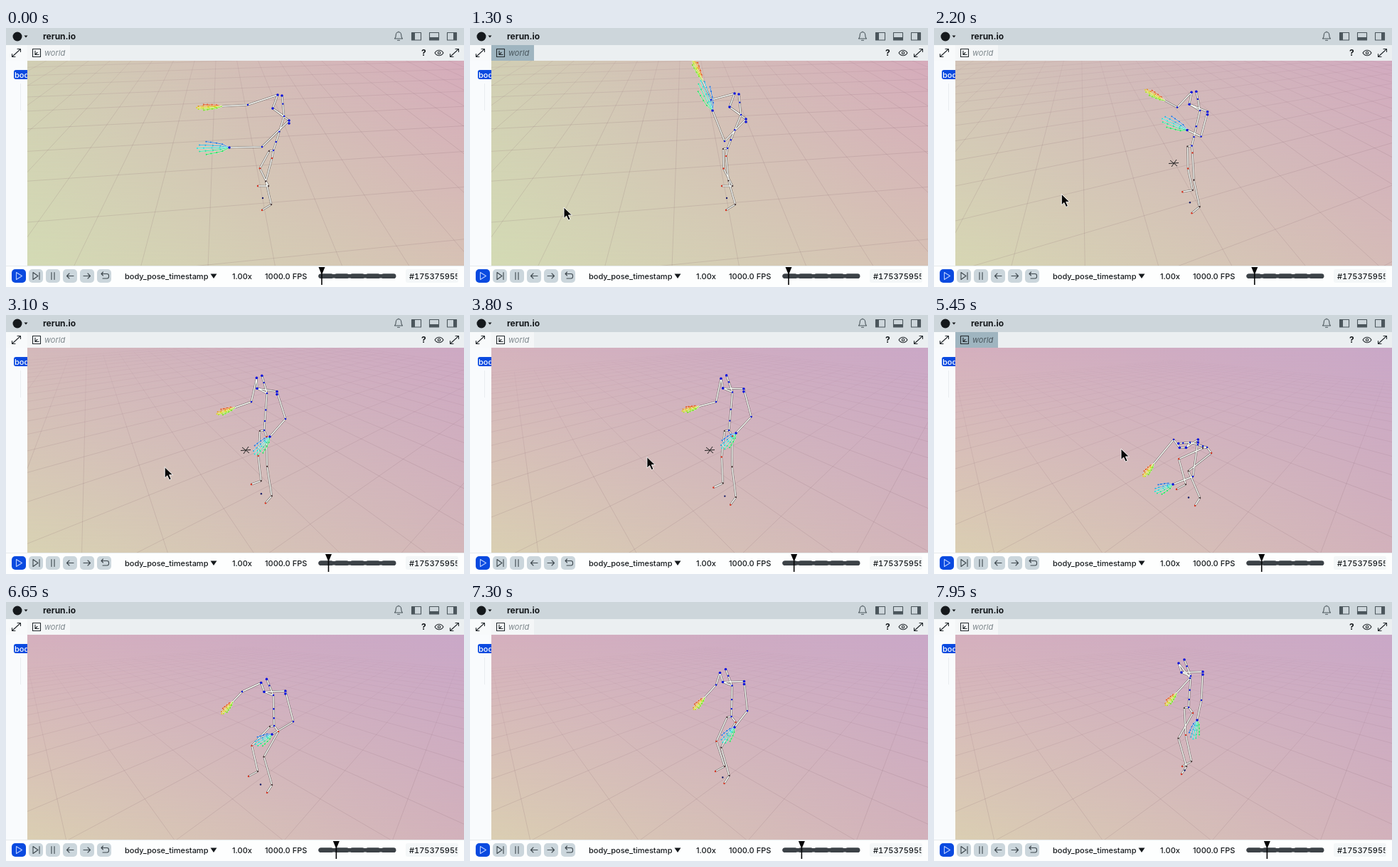
These frames come from a looping animation (644x364 px, 8 s). An HTML page:

```html
<!DOCTYPE html>
<html lang="en">
<head>
<meta charset="utf-8">
<title>Body pose viewer</title>
<style>
  html, body { margin: 0; width: 100%; height: 100%; overflow: hidden; background: #fff; }
  svg { display: block; width: 100vw; height: 100vh; }
  text { font: 450 11px Inter, sans-serif; fill: #15191c; }
  .title { font-size: 12px; font-weight: 700; }
  .icon { fill: none; stroke: #4b565c; stroke-width: 1.1; stroke-linecap: round; stroke-linejoin: round; }
  #label { font-style: italic; }
  #stamp { font-variant-numeric: tabular-nums; }
</style>
</head>
<body>
<svg viewBox="0 0 644 364" preserveAspectRatio="none">
  <defs>
    <linearGradient id="top"><stop/><stop offset="1"/></linearGradient>
    <linearGradient id="bottom"><stop/><stop offset="1"/></linearGradient>
    <linearGradient id="fade" x2="0" y2="1"><stop stop-color="#000"/><stop offset="1" stop-color="#fff"/></linearGradient>
    <linearGradient id="ink" gradientUnits="userSpaceOnUse" x1="0" x2="0">
      <stop stop-color="#7d4a66" stop-opacity="0"/><stop offset="1" stop-color="#7d5a66" stop-opacity=".17"/>
    </linearGradient>
    <mask id="lower" style="mask-type:luminance"><rect x="30" y="46" width="614" height="288" fill="url(#fade)"/></mask>
    <clipPath id="view"><rect x="30" y="46" width="614" height="288"/></clipPath>
    <clipPath id="side"><rect y="46" width="30" height="288"/></clipPath>
    <clipPath id="chip"><rect x="562" y="338" width="72.5" height="22"/></clipPath>
  </defs>

  <g clip-path="url(#view)">
    <rect x="30" y="46" width="614" height="288" fill="url(#top)"/>
    <rect x="30" y="46" width="614" height="288" fill="url(#bottom)" mask="url(#lower)"/>
    <path id="grid" fill="none" stroke="url(#ink)"/>
    <path id="cross" d="M330 190.500l14-1M332 186l10 8M341 185l-7 10" stroke="#222" fill="none"/>
    <path id="edge" fill="none" stroke="#62605f" stroke-width="2.5" stroke-linejoin="round"/>
    <path id="bone" fill="none" stroke="#fbfbf6" stroke-width="1.4" stroke-linejoin="round"/>
    <g id="marks"></g>
  </g>

  <!-- header and tabs -->
  <rect width="644" height="24" fill="#cdd6db"/>
  <circle cx="16" cy="12" r="6.5" fill="#15191c"/>
  <path d="M25.5 10.5h5l-2.500 3z" fill="#15191c"/>
  <text class="title" x="52" y="16">rerun.io</text>
  <g class="icon">
    <path d="M546.5 15h11c-1.5-1.5-1.8-3-1.8-5.5a3.7 3.7 0 0 0-7.4 0c0 2.5-.3 4-1.8 5.5zM550.5 17.2h3M552 5v.6"/>
    <path d="M570.5 6.500h13v10.500h-13zM595.500 6.500h13v10.500h-13zM620.500 6.500h13v10.500h-13z"/>
  </g>
  <path d="M571 7h4v10h-4zM596 13h12v4h-12zM629 7h4v10h-4z" fill="#4b565c"/>
  <rect y="24" width="644" height="22" fill="#ebeff1"/>
  <rect y="24" width="30" height="22" fill="#f8fafb"/>
  <rect id="tab" x="30" y="24" width="60" height="22"/>
  <g class="icon" style="stroke:#23292d">
    <path d="M9 40l11-10M16 29.5h4.5v4M8.5 36.5v4H13M625 40l11-10M632 29.5h4.5v4M624.5 36.5v4H629"/>
    <path d="M37.5 29.5h11v11h-11zM41 32v5.5h5M41 37.5l3-3"/>
    <path d="M603 35c3-5 9-5 12 0c-3 5-9 5-12 0z"/><circle cx="609" cy="35" r="1.7"/>
  </g>
  <text id="label" x="54" y="38.5">world</text>
  <text class="title" x="584" y="39">?</text>

  <!-- side panel -->
  <g clip-path="url(#side)">
    <rect y="46" width="30" height="288" fill="#f9fbfd"/>
    <path d="M20.5 78v38" stroke="#e9edf0"/>
    <rect x="11" y="59" width="40" height="13" rx="3" fill="#0a4ae0"/>
    <text x="12" y="69.5" style="fill:#fff">body</text>
  </g>

  <!-- playback bar -->
  <rect y="334" width="644" height="30" fill="#fdfefe"/>
  <path d="M0 334.5h644" stroke="#e6eaec"/>
  <g id="buttons"></g>
  <g class="icon" style="stroke:#3d474d">
    <path d="M14.5 343.5v10l8-5z" stroke="#b9ccff"/>
    <path d="M38 343.5v10l7-5zM47 343.5v10M64 343.5v10M68 343.5v10M95 348.5H85.5M89 345l-3.5 3.5l3.5 3.5M109 348.5h9.5M115 345l3.5 3.5l-3.5 3.5"/>
    <path d="M134 345.5h8a2.5 2.5 0 0 1 2.5 2.5v1.5a2.5 2.5 0 0 1-2.5 2.5h-6M136.5 343l-2.5 2.5l2.5 2.5"/>
  </g>
  <text x="167" y="352.5">body_pose_timestamp</text>
  <path d="M287.5 345.5h9l-4.5 6.5z" fill="#15191c"/>
  <text x="318" y="352.5">1.00x</text>
  <text x="364" y="352.5">1000.0 FPS</text>
  <g stroke="#3c4247" stroke-linecap="round">
    <path d="M442 348.7H545.500" stroke-width="5.500"/>
    <path d="M443 348.700H545" stroke-width="6.700" stroke-dasharray="14 8"/>
  </g>
  <path id="playhead" d="M-4.5 336h9L.8 345v16h-1.6v-16z" fill="#050607"/>
  <rect x="562" y="339" width="74" height="19" rx="3" fill="#f4f7f8"/>
  <g clip-path="url(#chip)"><text id="stamp" x="567" y="352.5">#1753759555</text></g>

  <path id="pointer" d="M0 0v15.500l3.600-3.400l2.700 6l2.800-1.200l-2.700-5.900h5z" fill="#080808" stroke="#fff" stroke-width=".9"/>
</svg>
<script>
const LOOP = 8000, STEP = 50;
const DRAG_START = 1400, DRAG_END = 4500;
const $ = id => document.getElementById(id);
const mix = (a, b, k) => a + (b - a) * k;
const mixAll = (a, b, k) => a.map((v, i) => mix(v, b[i], k));
const add = (a, b) => [a[0] + b[0], a[1] + b[1]];
const clamp01 = v => Math.min(1, Math.max(0, v));
const easeOut = (u, power) => 1 - (1 - u) ** power;

// The performer's main joints; everything else on the body follows from these.
const moves = [
  { time: 0,    neck: [391,124], hip: [376,172], elbowA: [340,108], handA: [304,110], elbowB: [360,167], handB: [314,168] },
  { time: 1300, neck: [381,122], hip: [362,169], elbowA: [339,101], handA: [327,74],  elbowB: [358,159], handB: [341,116] },
  { time: 3100, neck: [367,110], hip: [363,162], elbowA: [345,122], handA: [322,130], elbowB: [393,146], handB: [371,171] },
  { time: 4500, neck: [371,107], hip: [365,162], elbowA: [347,122], handA: [322,127], elbowB: [398,140], handB: [377,161] },
  { time: 5450, neck: [360,179], hip: [384,186], elbowA: [337,175], handA: [309,209], elbowB: [364,227], handB: [336,238] },
  { time: 6650, neck: [376,131], hip: [377,174], elbowA: [332,126], handA: [319,140], elbowB: [404,168], handB: [374,186] },
  { time: 7950, neck: [361,104], hip: [358,148], elbowA: [360,107], handA: [341,128], elbowB: [376,138], handB: [370,166] }
];

const chains = [
  'armA elbowA handA', 'armA collar armB', 'collar neck', 'head nape neck chest waist hip',
  'armB elbowB handB', 'hip hipA kneeA footA toeA', 'hip hipB kneeB footB toeB'
].map(c => c.split(' '));

const dots = [
  { names: 'armA collar head armB armB2 handB', color: '#0b12dd', r: 1.8 },
  { names: 'nape neck chest waist hip elbowA elbowB', color: '#0b12dd', r: 1.2 },
  { names: 'kneeA toeA hipB toeB', color: '#d8321f', r: 1.2 },
  { names: 'hipA footA kneeB footB', color: '#3b2323', r: 1.1 },
  { names: 'floor', color: '#141a66', r: 1.2 }
];

function mainJoints(t) {
  const i = Math.max(1, moves.findIndex(m => m.time >= t));
  const a = moves[i - 1], b = moves[i], u = (t - a.time) / (b.time - a.time);
  const joints = {};
  for (const name in a) if (name !== 'time') joints[name] = mixAll(a[name], b[name], u);
  return joints;
}

// Knee of a leg of the given length, bending to the left.
function knee(hip, foot, length) {
  const dx = foot[0] - hip[0], dy = foot[1] - hip[1], dist = Math.hypot(dx, dy);
  const bend = Math.sqrt(Math.max(9, (length ** 2 - dist ** 2) / 4)) / dist;
  return [hip[0] + dx / 2 - dy * bend, hip[1] + dy / 2 + dx * bend];
}

// turn goes from 0 (camera before the drag) to 1 (after it).
function bodyAt(t, turn) {
  const j = mainJoints(t);
  const lean = Math.max(0, Math.atan2(j.hip[0] - j.neck[0], j.hip[1] - j.neck[1]));
  const s = Math.sin(lean), c = Math.cos(lean), size = 1 - .35 * s;
  const view = (a, b) => mixAll(a, b, turn);
  const upper = ([x, y]) => add(j.neck, [(x * c + y * s) * size, (y * c - x * s) * size]);

  j.armA = upper(view([-9, -30], [-17, -18]));
  j.collar = upper(view([-16, -11], [-13, -5]));
  j.head = upper(view([-3, -29], [-9, -23]));
  j.nape = mixAll(j.neck, j.head, .6);
  j.armB = add(j.neck, view([7, 6], [17 * size, -6 * size]));
  j.armB2 = add(j.armB, [0, 4]);
  j.chest = mixAll(j.neck, j.hip, .45);
  j.waist = mixAll(j.neck, j.hip, .75);

  const stride = clamp01((t - 6650) / 1300);
  j.hipA = add(j.hip, [-6, 1]);
  j.hipB = add(j.hip, view([-2, 11], [6, 8]));
  j.footA = add(view([369, 222], [354, 238]), [8 * stride, -14 * stride]);
  j.footB = add(view([373, 248], [374, 257]), [-19 * stride, -26 * stride]);
  j.kneeA = knee(j.hipA, j.footA, mix(55, 74, turn));
  j.kneeB = knee(j.hipB, j.footB, mix(67, 82, turn));
  j.toeA = add(j.footA, view([-15, 0], [-13, 7]));
  j.toeB = add(j.footB, view([-13, 8], [-7, 11]));
  j.floor = add(mixAll(j.toeA, j.toeB, .5), [4, 0]);
  return j;
}

function gridPath(yaw, pitch) {
  const F = 277, DIST = 3.5, FLOOR = -.7, NEAR = .15, R = 16;
  const [sy, cy, sp, cp] = [Math.sin(yaw), Math.cos(yaw), Math.sin(pitch), Math.cos(pitch)];
  const toCamera = (x, z) => {
    const depth = x * sy + z * cy;
    return [x * cy - z * sy, depth * sp + FLOOR * cp, depth * cp - FLOOR * sp + DIST];
  };
  const put = ([x, y, d]) => (337 + F * x / d).toFixed(1) + ' ' + (190 - F * y / d).toFixed(1);
  const line = (a, b) => {
    if (a[2] < NEAR && b[2] < NEAR) return '';
    if (a[2] < NEAR) a = mixAll(a, b, (NEAR - a[2]) / (b[2] - a[2]));
    else if (b[2] < NEAR) b = mixAll(b, a, (NEAR - b[2]) / (a[2] - b[2]));
    return 'M' + put(a) + 'L' + put(b);
  };
  let d = '';
  for (let i = -R; i <= R; i++) {
    d += line(toCamera(i + .3, -R), toCamera(i + .3, R));
    d += line(toCamera(-R, i + .6), toCamera(R, i + .6));
  }
  const horizon = 190 - F * Math.tan(pitch);
  $('ink').setAttribute('y1', horizon + 15);
  $('ink').setAttribute('y2', horizon + 220);
  return d;
}

const dot = ([x, y], r, fill) => `<circle cx="${x.toFixed(1)}" cy="${y.toFixed(1)}" r="${r}" fill="${fill}"/>`;

// Five fingers fanning out along the forearm, coloured from one hue to another.
function handMarks(elbow, wrist, length, spread, hueA, hueB) {
  const [x, y] = wrist;
  const angle = Math.atan2(y - elbow[1], x - elbow[0]);
  const c = Math.cos(angle), s = Math.sin(angle);
  let out = '';
  for (let i = 0; i < 5; i++) {
    const color = `hsl(${mix(hueA, hueB, i / 4)} 78% 50%)`;
    const reach = length * (1 - .07 * (i - 2) ** 2);
    let d = `M${x.toFixed(1)} ${y.toFixed(1)}`, joints = '';
    for (const part of [.3, .55, .8, 1]) {
      const along = reach * part, side = (2 - i) * spread * Math.sqrt(part);
      const p = [x + c * along - s * side, y + s * along + c * side];
      d += 'L' + p.map(v => v.toFixed(1)).join(' ');
      joints += dot(p, 1, color);
    }
    out += `<path d="${d}" fill="none" stroke="#f4f6e6" stroke-width="1.6"/>` +
      `<path d="${d}" fill="none" stroke="${color}" stroke-width=".9"/>` + joints;
  }
  return out;
}

function paintSky(turn) {
  const shade = (stop, a, b) => stop.setAttribute('stop-color', `rgb(${mixAll(a, b, turn).map(Math.round)})`);
  const [topLeft, topRight] = $('top').children, [lowLeft, lowRight] = $('bottom').children;
  shade(topLeft, [210, 207, 180], [213, 176, 190]);
  shade(topRight, [214, 172, 188], [202, 168, 200]);
  shade(lowLeft, [211, 218, 180], [218, 206, 178]);
  shade(lowRight, [214, 193, 180], [210, 177, 187]);
}

function draw(t) {
  const u = clamp01((t - DRAG_START) / (DRAG_END - DRAG_START));
  const turn = easeOut(u, 1.5), tilt = easeOut(u, 1.15);
  const rad = Math.PI / 180;
  paintSky(turn);
  $('grid').setAttribute('d', gridPath(mix(5.4, 45, turn) * rad, mix(45, 30, tilt) * rad));

  const j = bodyAt(t, turn);
  const at = name => j[name].map(v => v.toFixed(1)).join(' ');
  const bones = chains.map(c => 'M' + c.map(at).join('L')).join('');
  $('edge').setAttribute('d', bones);
  $('bone').setAttribute('d', bones);
  $('marks').innerHTML =
    handMarks(j.elbowA, j.handA, mix(36, 23, turn), 2, 15, 95) +
    handMarks(j.elbowB, j.handB, mix(45, 27, turn), mix(4.5, 3.6, turn), 215, 140) +
    dots.map(({ names, color, r }) => names.split(' ').map(n => dot(j[n], r, color)).join('')).join('');

  const dragging = t >= DRAG_START && t < DRAG_END + 200;
  const visible = t >= 700 && t < 6000;
  const hover = visible && !dragging;
  $('cross').style.display = dragging ? '' : 'none';
  $('pointer').style.display = visible ? '' : 'none';
  $('pointer').setAttribute('transform', `translate(${mix(132, 263, turn).toFixed(1)} ${mix(252, 188, tilt).toFixed(1)})`);
  $('tab').setAttribute('fill', hover ? '#9fb5c0' : '#f4f6f7');
  $('label').style.fill = hover ? '#49565d' : '#7c868b';
  $('playhead').setAttribute('transform', `translate(${(444 + 24.5 * t / LOOP).toFixed(2)} 0)`);
}

for (let i = 0; i < 6; i++)
  $('buttons').innerHTML += `<rect x="${8 + 24 * i}" y="339" width="20" height="19" rx="5" fill="${i ? '#cbd6dc' : '#0a4ae0'}"/>`;

const start = performance.now();
let last = -1;
function tick() {
  const t = Math.floor((performance.now() - start) % LOOP / STEP) * STEP;
  if (t !== last) draw(last = t);
  requestAnimationFrame(tick);
}
tick();
</script>
</body>
</html>
```
